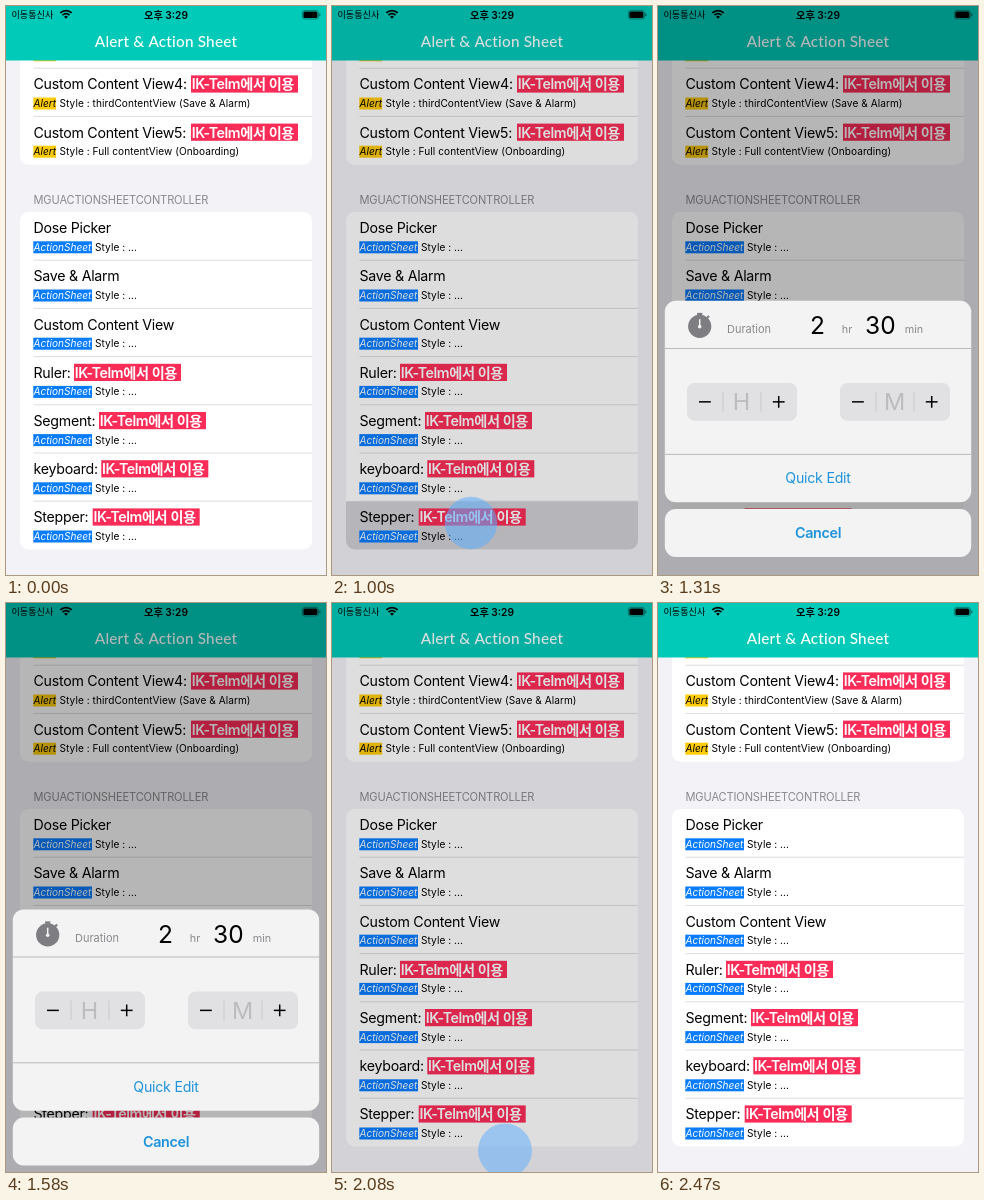
An HTML page with a canvas for the animation above (2520 ms loop, 320 px wide and 569 px high).

```html
<!DOCTYPE html>
<html lang="ko">
<head>
<meta charset="utf-8">
<title>Alert &amp; Action Sheet</title>
<style>
  html, body { margin: 0; width: 100%; height: 100%; overflow: hidden; background: #f2f2f7; }
  canvas { display: block; width: 320px; height: 569px; }
</style>
</head>
<body>
<canvas id="stage"></canvas>
<script>
const W = 320, H = 569, LOOP = 2520;
const ROW = 48.2, DIM = 0.285, REST_Y = 306;
const SANS = 'Inter, "Noto Sans CJK KR", "Noto Sans CJK", sans-serif';
const BLUE = '#1c93dc', GRAY = '#8a8a8e';

const canvas = document.getElementById('stage');
const ctx = canvas.getContext('2d');
const scale = window.devicePixelRatio || 1;
canvas.width = W * scale;
canvas.height = H * scale;

const clamp = v => Math.min(1, Math.max(0, v));
const progress = (t, start, end) => clamp((t - start) / (end - start));
const smooth = p => p * p * (3 - 2 * p);

function rect(x, y, w, h, color) {
  ctx.fillStyle = color;
  ctx.fillRect(x, y, w, h);
}

function panel(x, y, w, h, radius, color) {
  ctx.beginPath();
  ctx.roundRect(x, y, w, h, radius);
  ctx.fillStyle = color;
  ctx.fill();
}

function disc(x, y, r, color) {
  ctx.beginPath();
  ctx.arc(x, y, r, 0, 7);
  ctx.fillStyle = color;
  ctx.fill();
}

function line(x1, y1, x2, y2, color, width) {
  ctx.beginPath();
  ctx.moveTo(x1, y1);
  ctx.lineTo(x2, y2);
  ctx.strokeStyle = color;
  ctx.lineWidth = width;
  ctx.stroke();
}

function text(str, x, y, size, { color = '#000', style = '', spacing = 0, align = 'left', family = SANS } = {}) {
  ctx.font = `${style} ${size}px ${family}`;
  ctx.letterSpacing = spacing + 'px';
  ctx.textAlign = align;
  ctx.fillStyle = color;
  ctx.fillText(str, x, y);
}

function drawRow(top, title, badgeX, tag, detail) {
  text(title, 27.5, top + 21.2, 14.2, { spacing: -0.26 });
  if (badgeX) {
    rect(badgeX, top + 7.2, 107, 17.2, '#fb2d58');
    text('IK-Telm에서 이용', badgeX + 0.7, top + 21.2, 14.2, { color: '#fff', style: '600', spacing: -0.4 });
  }
  drawTag(top, tag);
  text(detail, tag === 'Alert' ? 53.5 : 89, top + 38.8, 10.1, { spacing: 0.06 });
}

function drawTag(top, tag) {
  const alert = tag === 'Alert';
  rect(27.3, top + 29.3, alert ? 22.8 : 58.7, 12, alert ? '#ffcc0a' : '#087cff');
  text(tag, 27.5, top + 38.8, 10.1, { color: alert ? '#000' : '#fff', style: 'italic' });
}

function separator(y) {
  rect(27.5, y - 0.5, 278.5, 1, '#dddde0');
}

const sheetRows = [
  ['Dose Picker'], ['Save & Alarm'], ['Custom Content View'],
  ['Ruler:', 68], ['Segment:', 93], ['keyboard:', 95.3], ['Stepper:', 86.7]
];

function drawList(highlight) {
  rect(0, 0, W, H, '#f2f2f7');

  panel(14, 40, 292, 118.8, 8.5, '#fff');
  drawTag(14, 'Alert');
  separator(62.2);
  drawRow(62.2, 'Custom Content View4:', 185, 'Alert', 'Style : thirdContentView (Save & Alarm)');
  separator(110.4);
  drawRow(110.4, 'Custom Content View5:', 185, 'Alert', 'Style : Full contentView (Onboarding)');

  text('MGUACTIONSHEETCONTROLLER', 27.5, 197.8, 11.1, { color: GRAY, spacing: -0.15 });

  panel(14, 206, 292, ROW * 7, 8.5, '#fff');
  if (highlight > 0) {
    ctx.globalAlpha = highlight;
    panel(14, 206 + ROW * 6, 292, ROW, [0, 0, 8.5, 8.5], '#d1d1d6');
    ctx.globalAlpha = 1;
  }
  sheetRows.forEach(([title, badgeX], i) => {
    const top = 206 + ROW * i;
    if (i) separator(top);
    drawRow(top, title, badgeX, 'ActionSheet', 'Style : ...');
  });
}

function drawBars() {
  rect(0, 0, W, 54.5, '#02cab9');
  text('이동통신사', 5.5, 12.2, 9.1);
  text('오후 3:29', 160, 12.6, 10.2, { style: '600', align: 'center' });
  text('Alert & Action Sheet', 160, 41.3, 15.3, {
    color: '#fff', style: '500', spacing: 0.2, align: 'center', family: 'Lato, sans-serif'
  });

  // Wi-Fi fan
  ctx.strokeStyle = '#000';
  ctx.lineWidth = 1.7;
  for (const r of [8, 5]) {
    ctx.beginPath();
    ctx.arc(60, 12.6, r, -Math.PI * 0.75, -Math.PI * 0.25);
    ctx.stroke();
  }
  ctx.beginPath();
  ctx.moveTo(60, 12.8);
  ctx.arc(60, 12.6, 2.7, -Math.PI * 0.75, -Math.PI * 0.25);
  ctx.fillStyle = '#000';
  ctx.fill();

  // Battery
  ctx.beginPath();
  ctx.roundRect(296.3, 4.4, 16.2, 8.6, 2.4);
  ctx.strokeStyle = 'rgba(0,0,0,.45)';
  ctx.lineWidth = 0.8;
  ctx.stroke();
  panel(297.4, 5.5, 14, 6.4, 1.5, '#000');
  panel(313.3, 7.2, 1.1, 3, 0.5, 'rgba(0,0,0,.5)');
}

function drawStopwatch(x, y) {
  const color = '#7e7e82';
  disc(x, y + 0.7, 11.6, color);
  rect(x - 2.6, y - 12.8, 5.2, 2.4, color);
  line(x + 7.2, y - 7.6, x + 9.4, y - 9.6, color, 2.2);
  line(x, y + 1, x, y - 6.5, '#f2f2f3', 1.5);
  disc(x, y + 1, 1.8, '#f2f2f3');
}

function drawStepper(x, y, label) {
  const mid = y + 18.8;
  panel(x, y, 110, 37.6, 7.5, '#e1e1e3');
  for (const dx of [36, 74]) line(x + dx, y + 9, x + dx, y + 28.6, '#c9c9cc', 1);
  line(x + 12, mid, x + 23.8, mid, '#000', 1.5);
  line(x + 85.8, mid, x + 97.6, mid, '#000', 1.5);
  line(x + 91.7, mid - 5.9, x + 91.7, mid + 5.9, '#000', 1.5);
  text(label, x + 54.5, mid + 8.6, 23.5, { color: '#bcbcbf', align: 'center' });
}

function drawSheet(y) {
  const fill = '#f3f3f4';
  panel(6.8, y, 306.4, 201.3, 11, fill);
  rect(6.8, y + 47.2, 306.4, 0.9, '#b4b4b7');
  rect(6.8, y + 153, 306.4, 0.9, '#b4b4b7');

  drawStopwatch(41.7, y + 24.8);
  text('Duration', 69, y + 32.4, 11, { color: GRAY });
  text('2', 159.4, y + 33.2, 24.5, { align: 'center' });
  text('hr', 183.8, y + 32.4, 10.8, { color: GRAY });
  text('30', 222.4, y + 33.2, 24.5, { align: 'center' });
  text('min', 246.8, y + 32.4, 10.8, { color: GRAY });

  drawStepper(29, y + 82.2, 'H');
  drawStepper(182, y + 82.2, 'M');
  text('Quick Edit', 160, y + 182.5, 14.2, { color: BLUE, spacing: -0.25, align: 'center' });

  panel(6.8, y + 208.2, 306.4, 48, 11, fill);
  text('Cancel', 160, y + 237.4, 14.3, { color: BLUE, style: '600', spacing: -0.3, align: 'center' });
}

// Holds briefly, then grows and fades like a released finger.
function drawTouch(t, start, x, y) {
  const p = progress(t, start + 110, start + 370);
  if (t < start || p >= 1) return;
  disc(x, y, 20 + 20 * p, `rgba(95,174,255,${0.72 * (1 - p) ** 0.75})`);
}

// Underdamped step response, returns the remaining distance from 1 to 0.
function springLeft(t) {
  const decay = 0.0131, freq = 0.01257;
  return Math.exp(-decay * t) * (Math.cos(freq * t) + decay / freq * Math.sin(freq * t));
}

function render(t) {
  ctx.setTransform(scale, 0, 0, scale, 0, 0);
  const leaving = smooth(progress(t, 1940, 2205));
  const dim = DIM * smooth(progress(t, 920, 1090)) * (1 - leaving);
  const highlight = t < 920 ? 0 : 1 - progress(t, 1180, 1400);

  drawList(highlight);
  drawBars();
  if (dim > 0) rect(0, 0, W, H, `rgba(0,0,0,${dim})`);
  if (t > 1050 && leaving < 1) {
    drawSheet(REST_Y + 300 * springLeft(t - 1050) + H * leaving);
  }
  drawTouch(t, 810, 139, 517);
  drawTouch(t, 1880, 173, 547.5);
}

const began = performance.now();
function tick() {
  render((performance.now() - began) % LOOP);
  requestAnimationFrame(tick);
}
tick();
</script>
</body>
</html>
```
